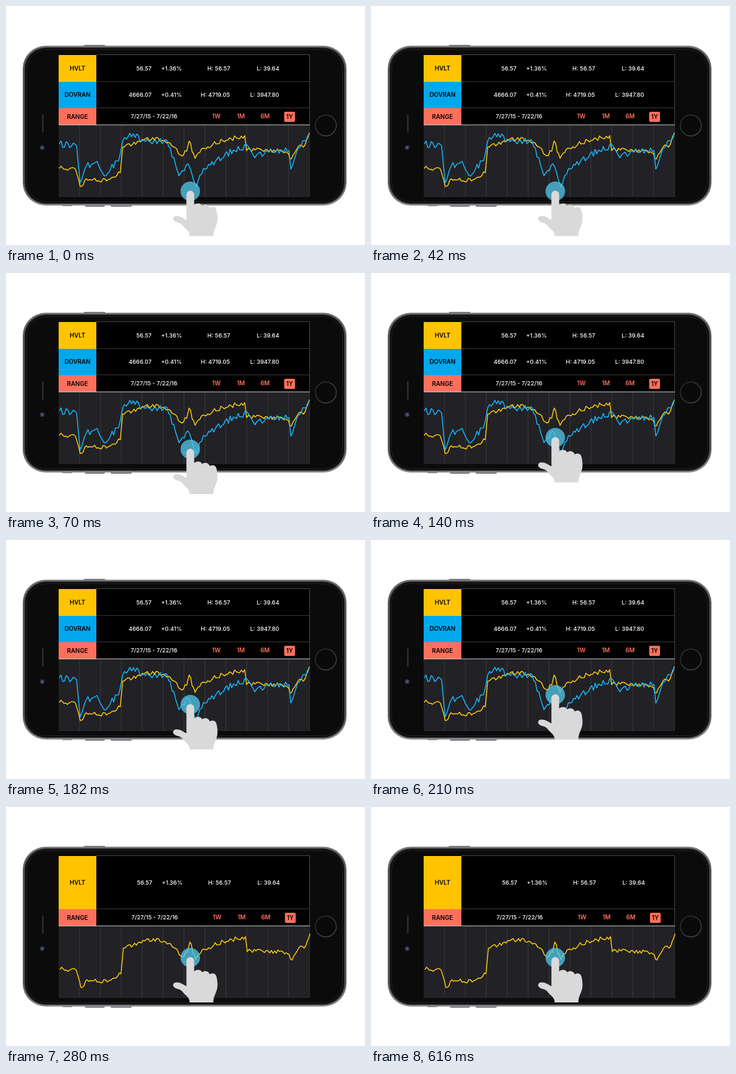
These frames come from a looping animation (600 px wide and 400 px high, 0.84 s). An HTML page:

```html
<!DOCTYPE html>
<html lang="en">
<head>
<meta charset="utf-8">
<title>Stock comparison swipe</title>
<style>
html, body { margin: 0; width: 100%; height: 100%; overflow: hidden; background: #fff; }
svg { display: block; width: 600px; height: 400px; }
text { font: 500 9.6px Inter, "Open Sans", sans-serif; fill: #fff; }
.tag { font-size: 10px; font-weight: 600; fill: #000; text-anchor: middle; }
.span { font-size: 10px; font-weight: 600; fill: #ff705c; text-anchor: middle; }
.end { text-anchor: end; }
.line { fill: none; stroke-width: 1.5; stroke-linejoin: round; }
</style>
</head>
<body>
<svg viewBox="0 0 600 400">
  <defs>
    <linearGradient id="rim" x1="0" y1="0" x2="0" y2="1">
      <stop offset="0" stop-color="#77777b"/>
      <stop offset=".15" stop-color="#5c5d61"/>
      <stop offset=".85" stop-color="#5c5d61"/>
      <stop offset="1" stop-color="#8e8f93"/>
    </linearGradient>
    <linearGradient id="ring" x1="0" y1="0" x2="1" y2="1">
      <stop offset="0" stop-color="#29292b"/>
      <stop offset="1" stop-color="#48484b"/>
    </linearGradient>
  </defs>

  <g fill="#7b7c80">
    <rect x="130" y="65" width="36" height="5" rx="1.5"/>
    <rect x="94" y="330" width="17" height="5" rx="1.5"/>
    <rect x="132" y="330" width="33" height="6" rx="1.5"/>
    <rect x="175" y="330" width="35" height="6" rx="1.5"/>
  </g>
  <rect x="28" y="66.5" width="541" height="267.5" rx="38" fill="url(#rim)"/>
  <rect x="30.5" y="69" width="536" height="262.5" rx="36" fill="#38383b"/>
  <rect x="32" y="70.5" width="533" height="259.5" rx="35" fill="#0b0b0c"/>
  <rect x="34.5" y="73" width="528" height="254.5" rx="33" fill="none" stroke="#242427"/>
  <rect x="60" y="181" width="3" height="31" rx="1.5" fill="#29292c"/>
  <circle cx="60.5" cy="237" r="4" fill="#2b323b"/>
  <circle cx="60.5" cy="237" r="2" fill="#4c5e78"/>
  <circle cx="534.5" cy="200" r="17.5" fill="#0a0a0b" stroke="url(#ring)" stroke-width="1.5"/>

  <rect x="88" y="81" width="420" height="238" fill="#000"/>
  <path d="M151 81.5H507.5V199" fill="none" stroke="#48484a"/>
  <rect x="88" y="199" width="420" height="120" fill="#212126"/>
  <path id="grid" stroke="#3a3a3f"/>
  <path d="M88 319H507.5V200" fill="none" stroke="#333337" stroke-width=".8"/>

  <path d="M151 170.5H508" stroke="#3a3a3c"/>
  <rect id="tile" x="88" y="82" width="63" height="45" fill="#ffc400"/>
  <rect x="88" y="171" width="63" height="28" fill="#ff705c"/>
  <path d="M88 199H508" stroke="#d8d8d8"/>
  <text class="tag" x="119.5" y="188.6">RANGE</text>

  <g id="first">
    <text class="tag" x="119.5" y="107.7">HVLT</text>
    <g class="shift">
      <text class="end" x="243.3" y="107.7">56.57</text>
      <text class="end" x="294" y="107.7">+1.36%</text>
      <text x="336.5" y="107.7">H: 56.57</text>
      <text x="419" y="107.7">L: 39.64</text>
    </g>
  </g>

  <g class="second">
    <path d="M151 126.5H508" stroke="#3a3a3c"/>
    <rect x="88" y="127" width="63" height="44" fill="#00a8ee"/>
    <text class="tag" x="119.5" y="151.7">DOVRAN</text>
    <text class="end" x="243.3" y="151.7">4666.07</text>
    <text class="end" x="294" y="151.7">+0.41%</text>
    <text x="325.5" y="151.7">H: 4719.05</text>
    <text x="408" y="151.7">L: 3947.80</text>
  </g>

  <g class="shift">
    <text x="208.5" y="188.4">7/27/15 - 7/22/16</text>
    <text class="span" x="351.5" y="188.4">1W</text>
    <text class="span" x="392.5" y="188.4">1M</text>
    <text class="span" x="433" y="188.4">6M</text>
    <rect x="465" y="177" width="18" height="17" rx="2" fill="#ff705c"/>
    <text class="span" x="474" y="188.6" style="fill:#000">1Y</text>
  </g>

  <path id="gold" class="line" stroke="#ffcc0a"/>
  <path id="blue" class="line second" stroke="#18b9ff"/>

  <g id="hand">
    <circle r="16.3" fill="#50c3e4" opacity=".78"/>
    <path fill="#d9d9d9" d="M-6.5 6C-6.5-3 6.5-3 6.5 6V23C11 19 18 20 19.5 24.5C25 21 31 23 32.5 28
      C38 25 43 27 44 33C45 37 45.5 42 45.5 46C45.5 58 38.5 63 38.5 75H-1C-1 66-8 64-13 57
      C-16 53-21 53-25 51C-31 48-29 42-24 41.5C-17 41-12 45-6.5 48Z"/>
  </g>
</svg>
<script>
const $ = id => document.getElementById(id);
const all = name => document.querySelectorAll("." + name);

// Turning points of each price curve; the daily noise between them is seeded.
const goldKeys = [
  [89, 272], [116, 273], [124, 302], [134, 289], [168, 293], [191, 279], [195, 236],
  [222, 226], [251, 220], [274, 229], [294, 251], [302, 243], [306, 226], [316, 255],
  [329, 238], [362, 225], [399, 217], [402, 242], [434, 240], [467, 244], [477, 256],
  [488, 236], [500, 232], [507, 212]];
const blueKeys = [
  [89, 231], [118, 234], [124, 296], [134, 268], [152, 260], [164, 284], [188, 259],
  [195, 226], [207, 213], [233, 227], [269, 225], [289, 284], [304, 264], [318, 303],
  [330, 272], [350, 260], [380, 241], [404, 234], [416, 254], [434, 243], [473, 242],
  [476, 273], [488, 238], [507, 214]];

function noise(seed) {
  return () => (seed = seed * 16807 % 2147483647) / 2147483647 - .5;
}

function trace(keys, seed, gain) {
  const rand = noise(seed), points = [];
  keys.slice(1).forEach(([x1, y1], k) => {
    const [x0, y0] = keys[k];
    const n = Math.max(1, Math.round((x1 - x0) / 2.8));
    for (let i = 0; i < n; i++)
      points.push([x0 + (x1 - x0) * i / n, y0 + (y1 - y0) * i / n + (i ? rand() * gain : 0)]);
  });
  points.push(keys[keys.length - 1]);
  return "M" + points.map(([x, y]) => x.toFixed(1) + " " + y.toFixed(1)).join("L");
}

$("gold").setAttribute("d", trace(goldKeys, 71, 8));
$("blue").setAttribute("d", trace(blueKeys, 205, 11));
$("grid").setAttribute("d", Array.from({ length: 11 },
  (_, i) => `M${(122.8 + i * 34.95).toFixed(1)} 200V319`).join(""));

const LOOP = 840, TICK = 70, STEPS = 4;
const mix = (a, b, t) => a + (b - a) * t;

// A smooth start with a softer, sine-like landing.
const ease = p => mix(p * p * (3 - 2 * p), Math.sin(p * Math.PI / 2), .45);

function draw(ms) {
  const step = Math.min(STEPS, Math.floor(ms % LOOP / TICK));
  const single = step === STEPS;
  const shift = single ? 1.2 : 0;

  $("hand").setAttribute("transform", `translate(308 ${mix(310, 252, ease(step / STEPS))})`);
  $("first").setAttribute("transform", `translate(0 ${single ? 22 : 0})`);
  $("tile").setAttribute("height", single ? 89 : 45);
  $("gold").setAttribute("transform", `translate(${shift} 0)`);
  for (const el of all("second")) el.style.display = single ? "none" : "";
  for (const el of all("shift")) el.setAttribute("transform", `translate(${shift} 0)`);
}

const start = performance.now();
function tick(now) {
  draw(Math.max(0, now - start));
  requestAnimationFrame(tick);
}
draw(0);
requestAnimationFrame(tick);
</script>
</body>
</html>
```
